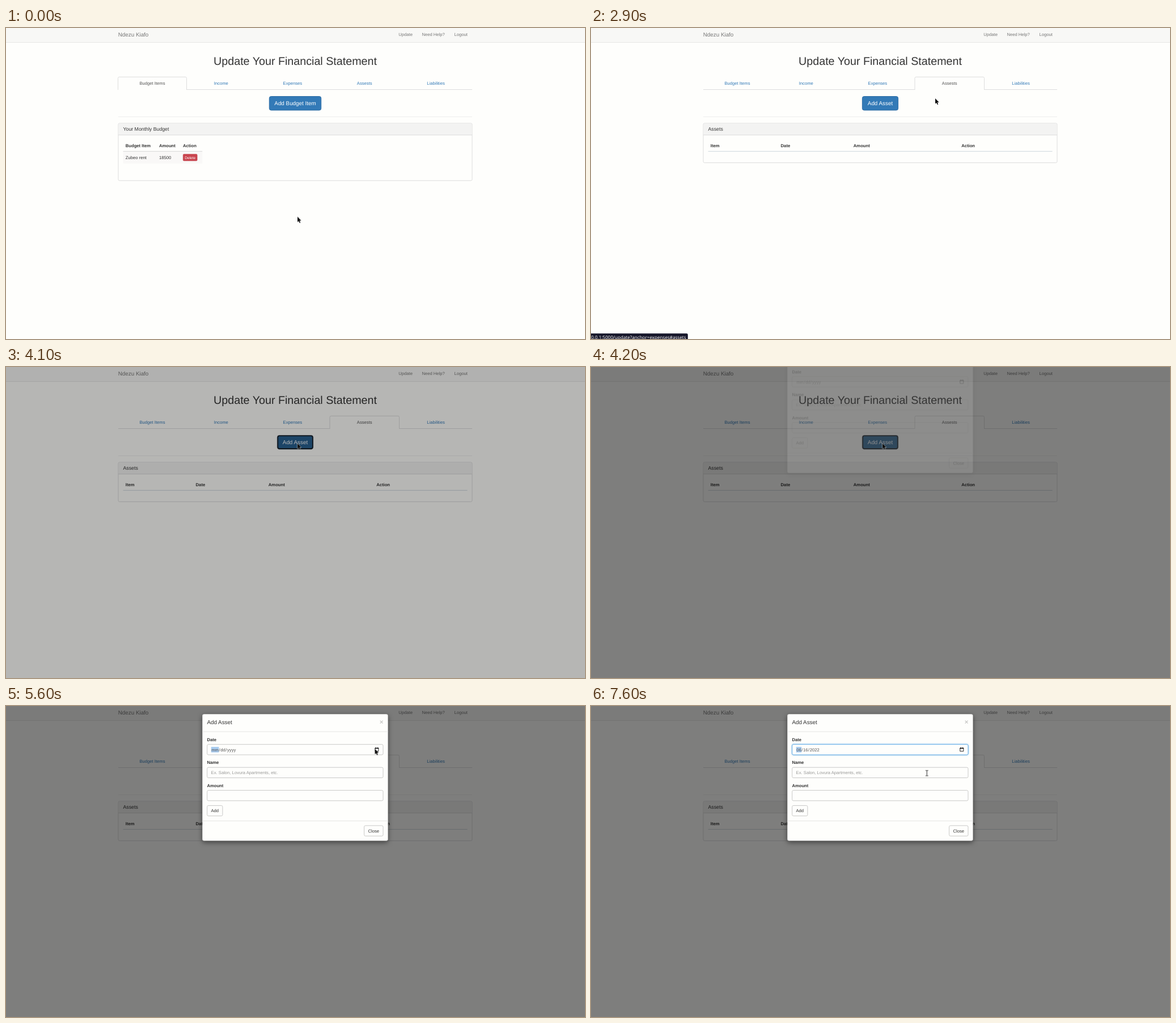
An HTML page for the animation above (8 s loop, 1021 px wide and 548 px high).

```html
<!DOCTYPE html>
<html lang="en">
<head>
<meta charset="utf-8">
<title>Financial Statement</title>
<style>
  html, body { margin: 0; width: 100%; height: 100%; overflow: hidden; background: #fefefc; }
  svg { display: block; width: 1021px; height: 548px; }
  text {
    font: 7.66px "Liberation Sans", Arial, sans-serif;
    fill: #333; text-rendering: geometricPrecision; white-space: pre;
  }
  .mid { text-anchor: middle; }
  .bold { font-weight: bold; }
  .big { font-size: 9.85px; }
  .title { font-size: 19.69px; }
  .panel-title { font-size: 8.75px; }
  .small { font-size: 6.56px; }
  .nav { fill: #777; }
  .link { fill: #337ab7; }
  .current { fill: #555; }
  .white { fill: #fff; }
  .hint { fill: #999; }
  .cross { font-size: 11.5px; font-weight: bold; fill: #c8c8c6; }
  .url { font: 8.1px "Open Sans", "Noto Sans", sans-serif; fill: #fff; text-anchor: end; }
  .day { font-size: 6.9px; text-anchor: middle; fill: #222; }
  .other { fill: #999; }
  .line { fill: none; stroke: #ddd; }
  .paper { fill: #fefefc; }
  .box { fill: #fefefc; stroke: #ddd; }
  .field { fill: #fefefc; stroke: #c9c9c8; }
  .primary { fill: #337ab7; stroke: #2e6da4; }

  .anim { animation: 8s step-end infinite; }
  .budget { animation-name: budget; }
  .assets { animation-name: assets; }
  .hover { animation-name: hover; }
  .status { animation-name: status; }
  .press { animation-name: press; }
  .ring { animation-name: ring; }
  .shade { animation-name: shade; }
  .modal { animation-name: modal; }
  .marked { animation-name: marked; }
  .focus { animation-name: focus; }
  .blank { animation-name: blank; }
  .filled { animation-name: filled; }
  .picker { animation-name: picker; }
  .pointer { animation-name: pointer; }
  .arrow { animation-name: arrow; }
  .hand { animation-name: hand; }
  .beam { animation-name: beam; }

  @keyframes budget { 0% { opacity: 1 } 28.75%, 100% { opacity: 0 } }
  @keyframes assets { 0% { opacity: 0 } 28.75%, 100% { opacity: 1 } }
  @keyframes hover { 0% { opacity: 0 } 21.25%, 100% { opacity: 1 } }
  @keyframes status { 0% { opacity: 0 } 23.75% { opacity: 1 } 40%, 100% { opacity: 0 } }
  @keyframes press {
    0% { fill: #337ab7; stroke: #2e6da4 }
    40%, 100% { fill: #286090; stroke: #204d74 }
  }
  @keyframes ring { 0% { opacity: 0 } 50%, 100% { opacity: 1 } }
  @keyframes shade {
    0% { opacity: 0 } 50% { opacity: .05 } 51.25% { opacity: .285 } 52.5%, 100% { opacity: .5 }
  }
  @keyframes modal {
    0% { opacity: 0; transform: translateY(-56px) }
    52.5% { opacity: .12; transform: translateY(-50.7px) }
    53.75% { opacity: .79; transform: translateY(-20px) }
    55% { opacity: .98; transform: translateY(-.7px) }
    57.5%, 100% { opacity: 1; transform: none }
  }
  @keyframes marked { 0% { opacity: 0 } 68.75%, 100% { opacity: 1 } }
  @keyframes focus { 0% { opacity: 0 } 71.25% { opacity: .7 } 72.5%, 100% { opacity: 1 } }
  @keyframes blank { 0% { opacity: 1 } 87.5%, 100% { opacity: 0 } }
  @keyframes filled { 0% { opacity: 0 } 87.5%, 100% { opacity: 1 } }
  @keyframes picker { 0% { opacity: 0 } 71.25% { opacity: 1 } 87.5%, 100% { opacity: 0 } }

  /* ten positions a second along each leg */
  @keyframes pointer {
    0% { transform: translate(514px, 332.5px) }
    2.5% { transform: translate(514px, 332.5px); animation-timing-function: steps(4) }
    7.5% { transform: translate(506px, 351px); animation-timing-function: steps(5) }
    13.75% { transform: translate(592px, 154px); animation-timing-function: steps(6) }
    21.25% { transform: translate(629px, 103px); animation-timing-function: steps(1) }
    22.5% { transform: translate(628px, 97px); animation-timing-function: steps(2) }
    25% { transform: translate(628px, 96px) }
    28.75% { transform: translate(628px, 96px); animation-timing-function: steps(5) }
    35% { transform: translate(624px, 108px); animation-timing-function: steps(1) }
    36.25% { transform: translate(607px, 124px); animation-timing-function: steps(2) }
    38.75% { transform: translate(545px, 134px); animation-timing-function: steps(3) }
    42.5% { transform: translate(514px, 134.5px) }
    56.25% { transform: translate(514px, 134.5px); animation-timing-function: steps(9) }
    67.5% { transform: translate(650.5px, 75.5px) }
    71.25% { transform: translate(650.5px, 75.5px); animation-timing-function: steps(6) }
    78.75% { transform: translate(444px, 143px); animation-timing-function: steps(3) }
    82.5% { transform: translate(433px, 163px) }
    87.5% { transform: translate(433px, 163px); animation-timing-function: steps(4) }
    92.5% { transform: translate(649px, 112px); animation-timing-function: steps(2) }
    95%, 100% { transform: translate(592.3px, 118.2px) }
  }
  @keyframes arrow {
    0% { opacity: 1 } 21.25% { opacity: 0 } 28.75% { opacity: 1 } 40% { opacity: 0 }
    51.25% { opacity: 1 } 58.75% { opacity: 0 } 62.5% { opacity: 1 } 88.75%, 100% { opacity: 0 }
  }
  @keyframes hand {
    0% { opacity: 0 } 21.25% { opacity: 1 } 28.75% { opacity: 0 }
    40% { opacity: 1 } 51.25%, 100% { opacity: 0 }
  }
  @keyframes beam {
    0% { opacity: 0 } 58.75% { opacity: 1 } 62.5% { opacity: 0 } 88.75%, 100% { opacity: 1 }
  }
</style>
</head>
<body>
<svg viewBox="0 0 1021 548">
  <defs>
    <filter id="drop" x="-10%" y="-10%" width="120%" height="125%">
      <feDropShadow dx="0" dy="2.7" stdDeviation="4" flood-color="#000" flood-opacity=".5"/>
    </filter>
    <filter id="glow" filterUnits="userSpaceOnUse" x="340" y="55" width="340" height="45">
      <feDropShadow dx="0" dy="0" stdDeviation="1.8" flood-color="#66afe9" flood-opacity=".75"/>
    </filter>
  </defs>

  <rect class="paper" width="1021" height="548"/>

  <!-- navigation bar -->
  <rect width="1021" height="25" fill="#f8f8f6"/>
  <path d="M0 25.5H1021" stroke="#e7e7e6"/>
  <text class="nav big" x="197.7" y="14.9">Ndezu Kiafo</text>
  <text class="nav" x="692.3" y="14.3">Update</text>
  <text class="nav" x="733.4" y="14.3">Need Help?</text>
  <text class="nav" x="790.4" y="14.3">Logout</text>

  <text class="title mid" x="510" y="65.1">Update Your Financial Statement</text>

  <!-- shared tabs -->
  <path class="line" d="M198 108.5H822"/>
  <text class="link mid" x="379.3" y="100.2">Income</text>
  <text class="link mid" x="505.4" y="100.2">Expenses</text>
  <text class="link mid" x="758" y="100.2">Liabilities</text>
  <path d="M198 156.4H822" stroke="#eee"/>

  <!-- budget tab -->
  <g class="anim budget">
    <path class="box" d="M197.5 109V88.5q0-2.2 2.2-2.2H316.3q2.2 0 2.2 2.2V109"/>
    <text class="current mid" x="258" y="100.2">Budget Items</text>
    <text class="link mid" x="632.2" y="100.2">Assests</text>
    <g class="anim hover">
      <path fill="#ececeb" d="M571 108V88.2q0-2.2 2.2-2.2H691.8q2.2 0 2.2 2.2V108z"/>
      <text class="mid" style="fill:#23527c" x="632.2" y="100.2">Assests</text>
    </g>
    <rect class="primary" x="464.3" y="120.5" width="91.4" height="24.4" rx="3.3"/>
    <text class="white big mid" x="510" y="136">Add Budget Item</text>

    <rect class="box" x="198" y="167.9" width="624" height="101" rx="2.2"/>
    <rect x="198.5" y="168.4" width="623" height="20" rx="1.7" fill="#f3f3f2"/>
    <path class="line" d="M198 188.6H822"/>
    <text class="panel-title" x="206.5" y="181.2">Your Monthly Budget</text>
    <text class="bold" x="210.8" y="209.8">Budget Item</text>
    <text class="bold" x="269.9" y="209.8">Amount</text>
    <text class="bold" x="312" y="209.8">Action</text>
    <rect x="206.6" y="218" width="139.6" height="20.6" fill="#f9f8f7"/>
    <path class="line" d="M206.6 217.4H346.2" stroke-width="1.2"/>
    <text x="210.8" y="230.5">Zubeo rent</text>
    <text x="269.9" y="230.5">18500</text>
    <rect x="312.3" y="222.3" width="24.8" height="11.7" rx="1.6" fill="#c9444e" stroke="#c23b45" stroke-width=".6"/>
    <text class="white small mid" x="324.7" y="230.5">Delete</text>
  </g>

  <!-- assets tab -->
  <g class="anim assets">
    <path class="box" d="M571 109V88.5q0-2.2 2.2-2.2H691.3q2.2 0 2.2 2.2V109"/>
    <text class="link mid" x="258" y="100.2">Budget Items</text>
    <text class="current mid" x="632.2" y="100.2">Assests</text>
    <rect class="primary anim press" x="478.4" y="120.5" width="63.2" height="24.4" rx="3.3"/>
    <g class="anim ring" fill="none">
      <rect x="478" y="120" width="64" height="25.2" rx="3.6" stroke="#e4e4e2" stroke-width=".8"/>
      <rect x="479.3" y="121.3" width="61.4" height="22.6" rx="2.6" stroke="#14181d" stroke-width="1.6"/>
    </g>
    <text class="white big mid" x="510" y="136">Add Asset</text>

    <rect class="box" x="198" y="167.9" width="624" height="69.5" rx="2.2"/>
    <rect x="198.5" y="168.4" width="623" height="20" rx="1.7" fill="#f3f3f2"/>
    <path class="line" d="M198 188.6H822"/>
    <text class="panel-title" x="206.5" y="181.2">Assets</text>
    <text class="bold" x="210.8" y="209.8">Item</text>
    <text class="bold" x="334.6" y="209.8">Date</text>
    <text class="bold" x="462.8" y="209.8">Amount</text>
    <text class="bold" x="653.2" y="209.8">Action</text>
    <path d="M206.6 217.4H813.5" stroke="#d6dde2" stroke-width="1.2"/>
  </g>

  <!-- link preview -->
  <g class="anim status">
    <path fill="#17172a" d="M0 538.3H168.5q2.3 0 2.3 2.3V548H0z"/>
    <text class="url" x="167.5" y="547.6">.0.0.1:5000/update?anchor=expenses#assets</text>
  </g>

  <rect class="anim shade" width="1021" height="548"/>

  <!-- dialog -->
  <g class="anim modal">
    <rect class="paper" x="346.2" y="14.2" width="327.4" height="223.3" rx="3.3" stroke="#000" stroke-opacity=".2" stroke-width=".6" filter="url(#drop)"/>
    <text class="big" x="354.4" y="32.4">Add Asset</text>
    <text class="cross mid" x="662" y="31.5">×</text>
    <path d="M346.5 45.2H673.5M346.5 202.5H673.5" stroke="#e5e5e4"/>

    <text class="bold" x="354.4" y="61.8">Date</text>
    <rect class="field" x="354.7" y="67.7" width="310.3" height="18.3" rx="2.2"/>
    <rect class="anim focus" x="354.7" y="67.7" width="310.3" height="18.3" rx="2.2" fill="#fefefc" stroke="#66afe9" filter="url(#glow)"/>
    <g class="anim blank">
      <rect class="anim marked" x="361.7" y="72" width="13.7" height="9.8" fill="#aacdf0"/>
      <text class="current" y="79.6"><tspan x="362.2">mm</tspan><tspan x="375.6">/</tspan><tspan x="378.2">dd</tspan><tspan x="387.3">/</tspan><tspan x="390">yyyy</tspan></text>
    </g>
    <g class="anim filled">
      <rect x="361.7" y="72" width="9.5" height="9.8" fill="#aacdf0"/>
      <text class="current" y="79.6"><tspan x="362.2">06</tspan><tspan x="371.3">/</tspan><tspan x="374">16</tspan><tspan x="383">/</tspan><tspan x="385.7">2022</tspan></text>
    </g>
    <path d="M650.8 74.2H656.8V79.8H650.8z" fill="none" stroke="#111" stroke-width=".9"/>
    <path d="M650.4 74.6H657.2M652 73V74.5M655.6 73V74.5" stroke="#111" stroke-width="1.3"/>

    <text class="bold" x="354.4" y="102.4">Name</text>
    <rect class="field" x="354.7" y="108.2" width="310.3" height="18.3" rx="2.2"/>
    <text class="hint" x="361.6" y="119.9">Ex. Salon, Lovura Apartments, etc.</text>

    <text class="bold" x="354.4" y="142.9">Amount</text>
    <rect class="field" x="354.7" y="148.6" width="310.3" height="18.3" rx="2.2"/>

    <rect class="field" x="354.7" y="175.4" width="27.2" height="18.3" rx="2.2"/>
    <text class="mid" x="368.3" y="187.1">Add</text>
    <rect class="field" x="631.6" y="210.8" width="33.4" height="18.3" rx="2.2"/>
    <text class="mid" x="648.3" y="222.6">Close</text>
  </g>

  <!-- date picker -->
  <g class="anim picker">
    <rect x="353" y="87.5" width="137.5" height="153.5" rx="1" fill="#fefefc" stroke="#bfbfbe"/>
    <text class="bold" style="font-size:7.1px" x="360" y="100">June 2022</text>
    <path d="M463.5 100.3V94.5M461 97L463.5 94.5 466 97M479 94.5V100.3M476.5 97.8L479 100.3 481.5 97.8" fill="none" stroke="#222" stroke-width=".8"/>
    <rect x="430" y="154.5" width="15.4" height="14.6" rx="1.2" fill="#2f76d2"/>
    <g id="days"></g>
    <text class="small link" x="360" y="234.5">Clear</text>
    <text class="small link" style="text-anchor:end" x="484" y="234.5">Today</text>
  </g>

  <!-- pointer -->
  <g class="anim pointer">
    <path class="anim arrow" d="M0 0V9.6L2.1 7.7 3.7 11.1 5.3 10.4 3.8 7.1H6.7z" fill="#111" stroke="#fff" stroke-width=".7" paint-order="stroke"/>
    <path class="anim hand" d="M-.8.6Q0-.6.8.6V3.6L4.6 4.4Q5.4 4.7 5.3 5.8L4.4 10H-.6L-3.2 6.6Q-3.2 5.5-2.2 5.7L-.8 6.8z" fill="#fff" stroke="#111" stroke-width=".9" stroke-linejoin="round"/>
    <path class="anim beam" d="M-2.3-4.6H-.6L0-4.1 .6-4.6H2.3M0-4.1V4.3M-2.3 4.8H-.6L0 4.3 .6 4.8H2.3" fill="none" stroke="#222" stroke-width="1"/>
  </g>
</svg>
<script>
  const days = document.getElementById("days");

  function label(value, col, row, kind) {
    const node = document.createElementNS(days.namespaceURI, "text");
    node.setAttribute("class", "day " + kind);
    node.setAttribute("x", 367.7 + col * 17.5);
    node.setAttribute("y", 130.2 + row * 17);
    node.textContent = value;
    days.append(node);
  }

  [..."SMTWTFS"].forEach((name, col) => label(name, col, -0.95, ""));
  for (let i = 0; i < 42; i++) {
    const date = new Date(2022, 4, 29 + i);
    const kind = date.getMonth() !== 5 ? "other" : date.getDate() === 16 ? "white" : "";
    label(date.getDate(), i % 7, Math.floor(i / 7), kind);
  }
</script>
</body>
</html>
```
